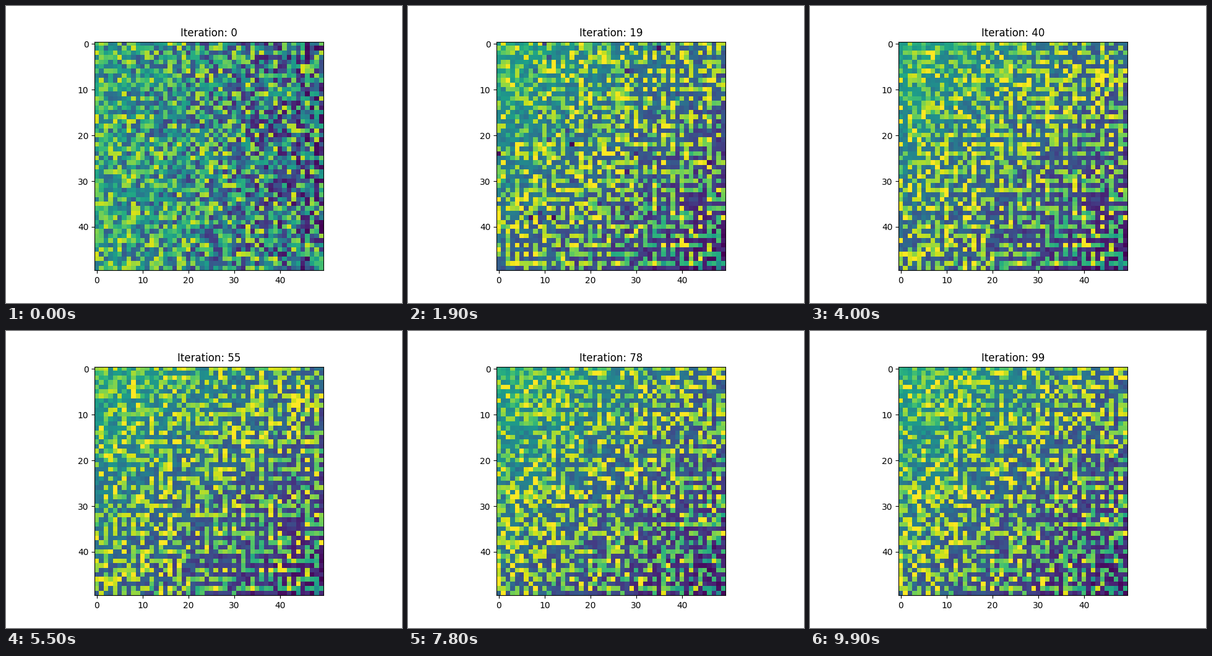
A matplotlib script for the animation above (10000 ms loop, 640 px wide and 480 px high).

```python
import numpy as np
import matplotlib.pyplot as plt
from matplotlib.animation import FuncAnimation

N = 50
FRAMES = 100
row, col = np.indices((N, N))
depth = (row + col) / (2 * N - 2)    # 0 at top left, 1 at bottom right
settle = 74 * (1 - depth)            # the lower right corner settles first


def noise(*seed):
    return np.random.default_rng(seed).random((4, N, N))


def start_field():
    """Nearly uniform noise that darkens to the right."""
    u = noise(7)[0]
    x = col / (N - 1)
    low = 0.3 * (1 - x)
    return low + (0.95 - low) * u ** (1 + 0.45 * x)


def graded_field(u, phase):
    """Diagonal ramp with bright cells that line up on even rows and columns."""
    pick, jitter, gap, spark = u
    low = 0.57 - 0.52 * depth + 0.16 * (jitter - 0.5)
    even = (row % 2 == 0) * 1.0 + (col % 2 == 0) * 1.0 - 1
    lattice = (0.42 if phase else 0.3) * np.clip(0.25 + depth, 0, 1)
    bright = pick < 0.45 + lattice * even
    lift = 0.17 + 0.36 * np.clip(2 * depth, 0, 1) + 0.2 * (gap - 0.3)
    lift += np.where(spark < 0.14, 0.28, 0)
    return np.clip(low + bright * lift, 0, 1)


start = start_field()
cycle = [graded_field(noise(21, p), p) for p in range(3)]


def state(k):
    if k == 0:
        return start
    loose = graded_field(noise(33, k), k % 3)
    mixed = np.where(noise(55, k)[0] < np.exp(-k / 6), noise(77, k)[1], loose)
    return np.where(k >= settle, cycle[k % 3], mixed)


fig, ax = plt.subplots(figsize=(6.4, 4.8), dpi=100)
image = ax.imshow(start, cmap="viridis", vmin=0, vmax=1)
title = ax.set_title("Iteration: 0")


def update(k):
    image.set_data(state(k))
    title.set_text(f"Iteration: {k}")
    return image, title


anim = FuncAnimation(fig, update, frames=FRAMES, interval=100,
                     repeat=True, repeat_delay=0, blit=False)
plt.show()
```
